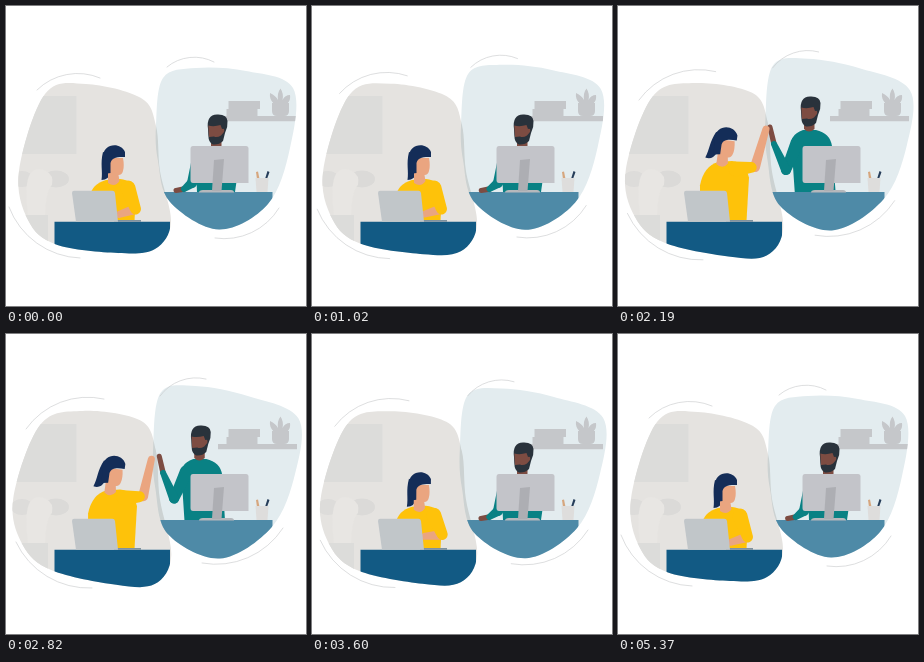
These frames come from a looping animation (300x300 px, 5400 ms). An HTML page:

```html
<!DOCTYPE html>
<html lang="en">
<head>
<meta charset="utf-8">
<title>High five</title>
<style>
  html, body { margin: 0; width: 100%; height: 100%; overflow: hidden; background: #fff; }
  svg { display: block; width: 100vw; height: 100vh; isolation: isolate; }
  .arc { fill: none; stroke: #c6c8ca; stroke-width: .6; stroke-linecap: round; }
  .skin { fill: #eaa580; }
  .shirt { fill: #fec20a; }
  .navy { fill: #142d58; }
  .brown { fill: #7d4c42; }
  .dark { fill: #29323b; }
  .teal { fill: #098184; }
  .grey { fill: #c5c7ca; }
</style>
</head>
<body>
<svg viewBox="0 0 300 300">
  <defs>
    <clipPath id="leftClip"><path id="leftClipShape"/></clipPath>
    <clipPath id="rightClip"><path id="rightClipShape"/></clipPath>
  </defs>
  <rect width="300" height="300" fill="#fff"/>
  <path id="leftBlob" fill="#e5e3e0"/>
  <g clip-path="url(#leftClip)">
    <path d="M0 90H70.5V148H0ZM0 209H42V245H0Z" fill="#dcdcda"/>
    <ellipse cx="16" cy="173" rx="11" ry="8" fill="#dddcda"/>
    <ellipse cx="50" cy="173" rx="13" ry="8.5" fill="#dbdad8"/>
    <path d="M22 209Q18 178 24 168Q30 160 40 165Q48 169 46 179Q40 184 39 209Z" fill="#e8e6e3"/>
  </g>
  <path id="rightBlob" fill="#e3ecef" style="mix-blend-mode:multiply"/>
  <path class="arc" id="arc0"/><path class="arc" id="arc1"/>
  <path class="arc" id="arc2"/><path class="arc" id="arc3"/>

  <g clip-path="url(#rightClip)" class="grey">
    <path d="M212 110H291V115.3H212Z"/>
    <path d="M222.5 95H254V103H251.5V110H220.5V103H222.5Z"/>
    <path d="M266 97H283V105Q283 110 278 110H271Q266 110 266 105Z"/>
    <path d="M268 98Q263 93 264 87Q270 90 272 94Q271 87 274.5 82.5Q278 88 276.5 94Q279 89 284 89Q285 94 281 98Z"/>
  </g>

  <path class="teal" id="manTorso"/>
  <g id="manHead">
    <path class="brown" d="M205 132H215.5V141Q210 146 205 141Z"/>
    <path class="dark" d="M202 123Q200 109 211 108.5Q221 108 221.5 115Q222 121 219 127L217 135Q213 139 207 138.5Q202.5 137 202.3 129Z"/>
    <path class="brown" d="M202.3 119.5Q208 121 214.5 119L216 123Q219 122 218 126L215 129.5Q211 132 208 130.500L203 131Z"/>
  </g>
  <g clip-path="url(#rightClip)"><path d="M140 186H266.5V230H140Z" fill="#4e8aa7"/></g>
  <path class="brown" id="manHand"/>
  <path class="teal" id="manSleeve"/>
  <path class="teal" id="manForearm"/>
  <path d="M193 186.5Q193 184 197 184H225Q228 184 228 186.5Z" fill="#b6b8bc"/>
  <path d="M187 140H240Q242.5 140 242.5 142.5V177H187Q184.5 177 184.5 174V143Q184.5 140 187 140Z" fill="#c3c4c9"/>
  <path d="M208 154L218 153L215.5 185H206Z" fill="#adaeb3"/>
  <path d="M250 166L252 165.5L253.5 173H251Z" fill="#d6a67e"/>
  <path d="M259 173L261.5 165L263.5 166L261 173Z" fill="#263d59"/>
  <path d="M249.5 172H262.5L261.5 186H250.5Z" fill="#dedddc"/>

  <g clip-path="url(#leftClip)"><path d="M48.5 215.7H164V255H48.5Z" fill="#125a84"/></g>
  <path class="shirt" id="womanTorso"/>
  <g id="womanHead">
    <path class="navy" id="ponytail" d="M97 146C94 158 97 165 95.5 174Q103 174 104.5 166L107 150Z"/>
    <path class="skin" d="M102 152H117Q118.5 160 117 165Q116 169 112.5 169L113.5 175Q109 182 102 177Z"/>
    <path class="navy" d="M97 152C96 138 114 135 119 146L119 151C112 151 106 151 104.5 157V167L98 168Z"/>
  </g>
  <path class="skin" id="womanForearm"/>
  <path class="shirt" id="womanSleeve"/>
  <path d="M108 214H135V215.8H108Z" fill="#7f929f"/>
  <path d="M68 184.7H106.5Q108.5 184.7 109 187L112 215.7H70L66 187Q66 184.7 68 184.7Z" fill="#c1c6c9"/>
</svg>
<script>
const LOOP = 5400;
const $ = id => document.getElementById(id);
const lerp = (a, b, k) => Array.isArray(a) ? a.map((v, i) => lerp(v, b[i], k)) : a + (b - a) * k;
const smooth = x => { x = Math.min(1, Math.max(0, x)); return x * x * (3 - 2 * x); };
const setPath = (id, d) => $(id).setAttribute('d', d);

// Resting outline; when it swells it stretches away from "pin" and twists around "centre".
const blobs = {
  left: {
    outline: [[13, 165], [39, 88], [80, 78], [135, 92], [150, 120], [154, 165],
      [165, 216], [149, 243], [112, 247], [50, 238.5], [22, 214]],
    centre: [90, 163], pin: [158, 175], stretch: [.04, .022], twist: -.0012
  },
  right: {
    outline: [[150, 120], [157, 72], [190, 62], [240, 65], [287, 82],
      [284, 142], [262, 198], [213, 223.5], [164, 196], [152, 155]],
    centre: [220, 143], pin: [197, 224], stretch: [.06, .035], twist: .0018
  }
};

// Resting and swollen ends of each loose line.
const arcs = [
  [[[31, 84], [94, 72]], [[20, 95], [98, 65]]],
  [[[74, 252], [3, 201]], [[86, 254], [10, 208]]],
  [[[161, 61], [208, 56]], [[154, 62], [200, 45]]],
  [[[273, 202], [209, 232]], [[277, 194], [196, 229]]]];

// Poses: at work, halfway up, high five.
const MID = .67;
const woman = {
  head: [[0, 0], [-1, -12], [0, -18]],
  shoulder: [[122, 182], [120, 173], [118, 163]],
  elbow: [[129.5, 203], [138, 178], [137, 161]],
  hand: [[113, 208.5], [115, 150], [148, 123]]
};
const man = {
  head: [[0, 0], [-7, -13], [-19, -18]],
  shoulder: [[193, 150], [186, 141], [179, 137]],
  elbow: [[186, 177], [168.5, 167], [168, 164]],
  wrist: [[178, 183], [161.5, 143], [156, 138]],
  tip: [[170, 184.5], [158.5, 128], [152, 121]]
};

function pose(figure, u) {
  const at = ([a, b, c]) => u < MID ? lerp(a, b, u / MID) : lerp(b, c, (u - MID) / (1 - MID));
  return Object.fromEntries(Object.entries(figure).map(([part, keys]) => [part, at(keys)]));
}

function swell({ outline, centre, pin, stretch, twist }, k) {
  return outline.map(([x, y]) => [
    x + k * stretch[0] * (x - pin[0]),
    y + k * (stretch[1] * (y - pin[1]) - twist * (x - centre[0]) * (y - centre[1]))
  ]);
}

function closedCurve(points) {
  const n = points.length;
  let d = 'M' + points[0];
  points.forEach((p, i) => {
    const before = points[(i + n - 1) % n], q = points[(i + 1) % n], after = points[(i + 2) % n];
    const c1 = p.map((v, j) => v + (q[j] - before[j]) / 6);
    const c2 = q.map((v, j) => v - (after[j] - p[j]) / 6);
    d += `C${c1} ${c2} ${q}`;
  });
  return d + 'Z';
}

// Tapered limb with round ends.
function limb(a, b, startWidth, endWidth) {
  const dx = b[0] - a[0], dy = b[1] - a[1], length = Math.hypot(dx, dy) || 1;
  const side = (p, w) => [p[0] - dy / length * w / 2, p[1] + dx / length * w / 2];
  const cap = (w, to) => `A${w / 2} ${w / 2} 0 0 0 ${to}`;
  return `M${side(a, startWidth)}L${side(b, endWidth)}${cap(endWidth, side(b, -endWidth))}` +
    `L${side(a, -startWidth)}${cap(startWidth, side(a, startWidth))}Z`;
}

function drawBackdrop(t) {
  const k = (1 - Math.cos(2 * Math.PI * t / LOOP)) / 2;
  for (const [name, blob] of Object.entries(blobs)) {
    const d = closedCurve(swell(blob, k));
    setPath(name + 'Blob', d);
    setPath(name + 'ClipShape', d);
  }
  arcs.forEach((arc, i) => {
    const [a, b] = lerp(...arc, k);
    const r = .9 * Math.hypot(b[0] - a[0], b[1] - a[1]);
    setPath('arc' + i, `M${a}A${r} ${r} 0 0 1 ${b}`);
  });
}

function drawWoman(t) {
  const u = smooth((t - 1200) / 780) - smooth((t - 2720) / 1040);
  const p = pose(woman, u);
  const y = p.head[1];
  p.hand[1] += Math.sin(2 * Math.PI * t / 540) * (1 - u) * .8;
  setPath('womanTorso', `M82 215L${84 - 2 * u} ${190 + y * .6}Q86 ${178 + y} 100 ${174 + y}` +
    `L114 ${173 + y}Q127 ${174 + y} ${130 + u} ${186 + y * .8}L128.5 215Z`);
  $('womanHead').setAttribute('transform', `translate(${p.head}) rotate(${8 * u} 108 150)`);
  $('ponytail').setAttribute('transform', `rotate(${12 * u} 101 148)`);
  setPath('womanForearm', limb(p.elbow, p.hand, 10, 7));
  setPath('womanSleeve', limb(p.shoulder, lerp(p.shoulder, p.elbow, 1 - .2 * u), 15, 11));
}

function drawMan(t) {
  const u = smooth((t - 1200) / 700) - smooth((t - 2700) / 800);
  const p = pose(man, u);
  const [x, y] = p.head;
  const typing = Math.sin(2 * Math.PI * t / 540) * (1 - u);
  p.tip[0] += typing * 1.2;
  p.wrist[0] += typing * .8;
  setPath('manTorso', `M${191 + x * .75} 186L${190 + x * .85} ${162 + y}Q${189 + x} ${147 + y} ${204 + x} ${142 + y}` +
    `H${217 + x}Q${231 + x} ${145 + y} ${233 + x} ${158 + y}L${229 + x * .6} 186Z`);
  $('manHead').setAttribute('transform', `translate(${p.head})`);
  setPath('manHand', limb(p.wrist, p.tip, 5.5, 5));
  setPath('manSleeve', limb(p.shoulder, p.elbow, 13, 10));
  setPath('manForearm', limb(p.elbow, p.wrist, 10, 6));
}

function render(t) {
  drawBackdrop(t);
  drawWoman(t);
  drawMan(t);
}

const start = performance.now();
function tick(now) {
  render(Math.max(0, now - start) % LOOP);
  requestAnimationFrame(tick);
}
render(0);
requestAnimationFrame(tick);
</script>
</body>
</html>
```
